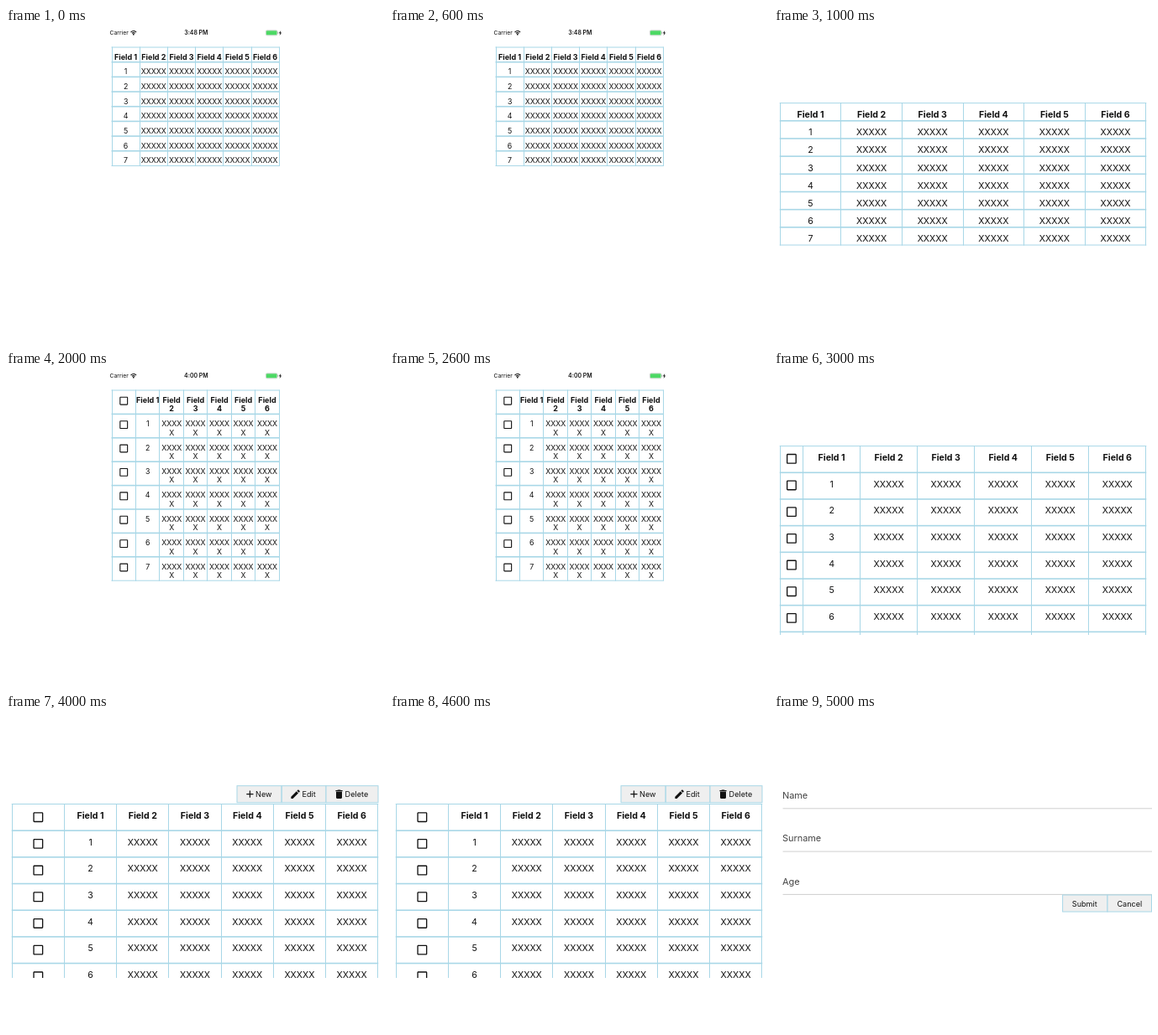
Write an HTML page with a canvas that moves like this. It is 450x376 px and loops after 6000 ms.

```html
<!DOCTYPE html>
<html lang="en">
<head>
<meta charset="utf-8">
<title>Responsive table</title>
<style>
html, body { margin: 0; width: 100%; height: 100%; overflow: hidden; background: #fff; }
canvas { display: block; width: 450px; height: 376px; }
</style>
</head>
<body>
<canvas id="stage"></canvas>
<script>
const W = 450, H = 376, SCENE_MS = 1000;
const BLUE = '#a8d7e7', INK = '#111';
const FONT = 'Inter, Roboto, sans-serif';
const canvas = document.getElementById('stage');
const ctx = canvas.getContext('2d');
const dpr = window.devicePixelRatio || 1;
canvas.width = W * dpr;
canvas.height = H * dpr;

// Material-style icons on a 24 unit grid
const icons = {
  box: new Path2D('M19 5v14H5V5h14m0-2H5c-1.1 0-2 .9-2 2v14c0 1.1.9 2 2 2h14c1.1 0 2-.9 2-2V5c0-1.1-.9-2-2-2z'),
  plus: new Path2D('M19 13h-6v6h-2v-6H5v-2h6V5h2v6h6v2z'),
  pencil: new Path2D('M3 17.25V21h3.75L17.81 9.94l-3.75-3.75zM20.71 7.04c.39-.39.39-1.02 0-1.41l-2.34-2.34c-.39-.39-1.02-.39-1.41 0l-1.83 1.83 3.75 3.75z'),
  trash: new Path2D('M6 19c0 1.1.9 2 2 2h8c1.1 0 2-.9 2-2V7H6zM19 4h-3.5l-1-1h-5l-1 1H5v2h14z')
};

function icon(name, cx, cy, size) {
  const k = size / 24;
  ctx.save();
  ctx.translate(cx - size / 2, cy - size / 2);
  ctx.scale(k, k);
  ctx.fillStyle = INK;
  ctx.fill(icons[name], 'evenodd');
  ctx.restore();
}

// y is the middle of the capital letters
function text(str, x, y, size, { weight = 400, align = 'center', color = INK } = {}) {
  ctx.font = `${weight} ${size}px ${FONT}`;
  ctx.textAlign = align;
  ctx.fillStyle = color;
  ctx.fillText(str, x, y + size * 0.364);
}

function rect(x, y, w, h, color) {
  ctx.fillStyle = color;
  ctx.fillRect(x, y, w, h);
}

function statusBar(time) {
  text('Carrier', 123.5, 5.8, 6.8, { align: 'left' });
  text(time, 226.3, 5.8, 6.9, { weight: 600 });

  ctx.strokeStyle = INK;
  ctx.lineWidth = 1.1;
  for (const r of [2.5, 4.5]) {
    ctx.beginPath();
    ctx.arc(151.8, 8.1, r, -Math.PI * 0.76, -Math.PI * 0.24);
    ctx.stroke();
  }
  ctx.fillStyle = INK;
  ctx.beginPath();
  ctx.arc(151.8, 7.7, 0.9, 0, Math.PI * 2);
  ctx.fill();

  ctx.fillStyle = '#4cd964';
  ctx.beginPath();
  ctx.roundRect(309.9, 3.3, 12.6, 5, 1);
  ctx.fill();
  ctx.strokeStyle = '#8fae95';
  ctx.lineWidth = 0.5;
  ctx.beginPath();
  ctx.roundRect(309.4, 2.8, 13.6, 6, 1.4);
  ctx.stroke();
  rect(323.4, 4.8, 0.8, 2, '#999');

  ctx.fillStyle = INK;
  ctx.fill(new Path2D('M327.2 2.9l-2.3 3.3h1.4l-.6 2.7 2.4-3.5h-1.4z'));
}

// checkW: width of the checkbox column, 0 for none
function table({ x, y, w, rowH, size, head, textY, checkW = 0, checkY = 0, wrap = 0 }) {
  const rows = 8, colW = (w - checkW) / 6, bottom = y + rowH * rows;
  const edges = Array.from({ length: 7 }, (_, i) => x + checkW + i * colW);
  if (checkW) edges.unshift(x);
  for (const ex of edges) rect(Math.round(ex - 0.5), y - 0.5, 1, bottom - y + 1, BLUE);
  for (let r = 0; r <= rows; r++) {
    const thick = r % rows ? 1.6 : 1;
    rect(x - 0.5, y + r * rowH - thick / 2, w + 1, thick, BLUE);
  }

  for (let r = 0; r < rows; r++) {
    const top = y + r * rowH;
    if (checkW) icon('box', x + checkW / 2, top + checkY, size * 1.5);
    for (let c = 0; c < 6; c++) {
      const cx = x + checkW + (c + 0.5) * colW;
      const style = { weight: r ? 400 : 700 };
      const fontSize = r ? size : head;
      let lines = [r ? (c ? 'XXXXX' : String(r)) : `Field ${c + 1}`];
      if (wrap && c) lines = r ? ['XXXX', 'X'] : ['Field', String(c + 1)];
      lines.forEach((s, i) => text(s, cx, top + textY + i * wrap, fontSize, style));
    }
  }
}

function button(label, x, y, w, labelX, glyph, glyphX) {
  rect(x, y, w, 20, '#efefef');
  ctx.strokeStyle = BLUE;
  ctx.lineWidth = 1;
  ctx.strokeRect(x, y, w, 20);
  text(label, labelX, y + 10.3, 9.1);
  if (glyph) icon(glyph, glyphX, y + 10, 14);
}

function portrait(time, options) {
  statusBar(time);
  table({ x: 126, y: 23, w: 199.2, size: 8.8, head: 9, textY: 11.5, ...options });
}

function landscape(options) {
  table({ x: 7.2, y: 89.6, w: 435.6, size: 10.6, head: 10.6, textY: 13.6, ...options });
}

function field(label, y) {
  text(label, 10, y, 10.9, { align: 'left', color: '#444' });
  rect(10.5, y + 15.3, W - 10.5, 1, '#cfcfcf');
}

const scenes = [
  () => portrait('3:48 PM', { rowH: 17.68 }),
  () => landscape({ rowH: 21.18 }),
  () => portrait('4:00 PM', { rowH: 28.4, checkW: 28.45, checkY: 12.7, wrap: 10.5 }),
  () => landscape({ rowH: 31.68, checkW: 27.4, checkY: 15.2 }),
  () => {
    landscape({ y: 107.5, rowH: 31.68, checkW: 62.23, checkY: 15.7 });
    button('New', 275, 85.7, 53, 306.8, 'plus', 290.4);
    button('Edit', 328.3, 85.7, 52.7, 360.6, 'pencil', 344.6);
    button('Delete', 381, 85.7, 62, 417.4, 'trash', 396.5);
  },
  () => {
    field('Name', 97);
    field('Surname', 148.3);
    field('Age', 199.6);
    button('Submit', 343.6, 216, 53.4, 369.8);
    button('Cancel', 397, 216, 52.5, 423.3);
  }
];

const start = performance.now();

function draw() {
  const t = Math.max(0, performance.now() - start);
  const index = Math.floor(t / SCENE_MS) % scenes.length;
  ctx.setTransform(dpr, 0, 0, dpr, 0, 0);
  rect(0, 0, W, H, '#fff');
  ctx.save();
  ctx.beginPath();
  ctx.rect(0, 0, W, 315);
  ctx.clip();
  scenes[index]();
  ctx.restore();
  requestAnimationFrame(draw);
}
draw();
</script>
</body>
</html>
```
